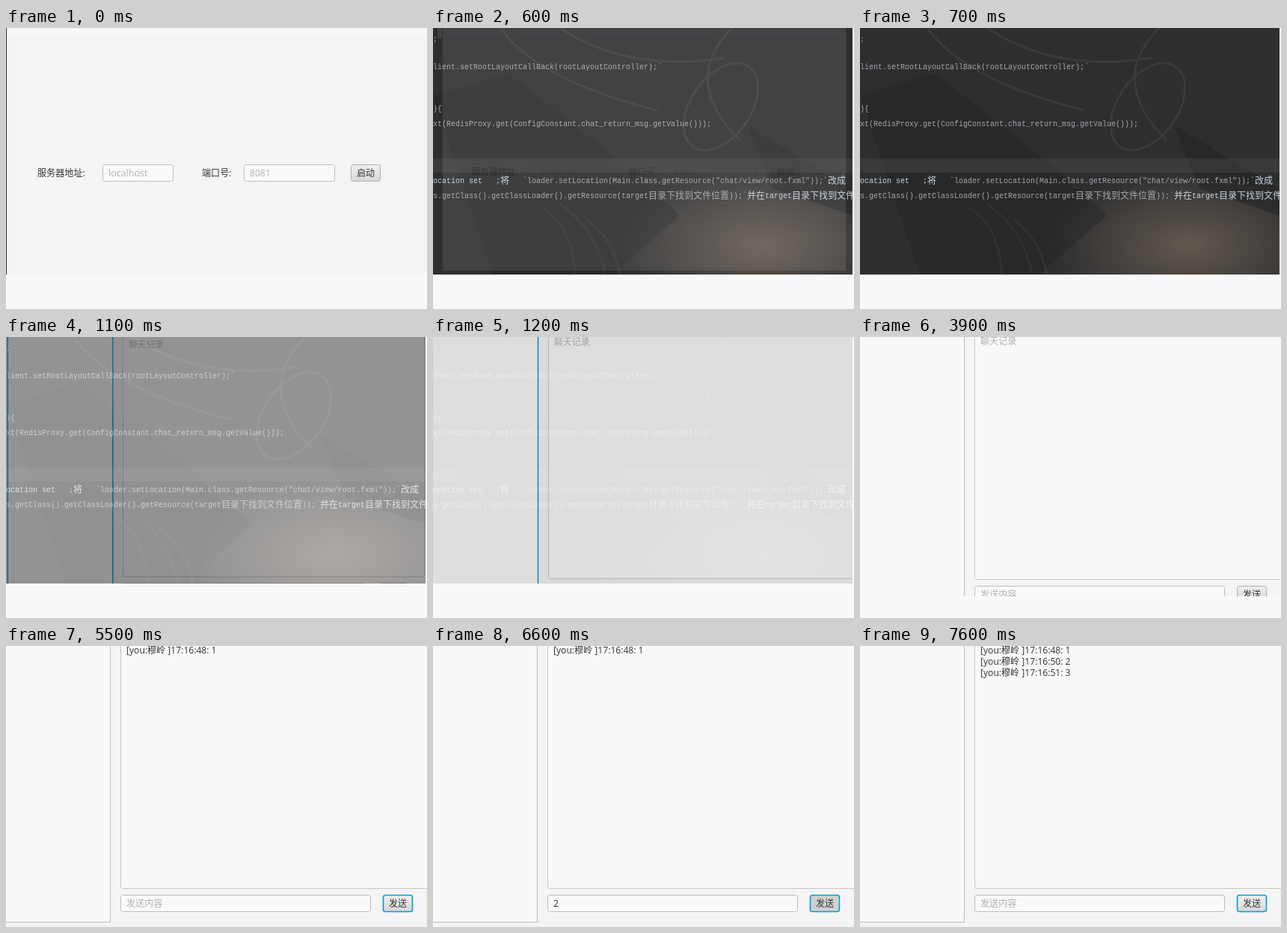
Write an HTML page that moves like this. It is 563 px wide and 375 px high and loops after 8400 ms.

```html
<!DOCTYPE html>
<html lang="zh-CN">
<head>
<meta charset="utf-8">
<title>聊天窗口</title>
<style>
html, body { margin: 0; width: 100%; height: 100%; overflow: hidden; background: #f8f8f8; }
svg { display: block; width: 563px; height: 375px; }
text { font: 12.1px "Open Sans", "Noto Sans CJK SC", "Noto Sans CJK", sans-serif; fill: #333; white-space: pre; }
.prompt { fill: #b2b2b2; }
.box { fill: #f9f9f9; stroke: #bcbcbc; }
.button { fill: url(#face); stroke: #b0b0b0; }
.focus { stroke: #039ed3; stroke-width: 1.6; }
.hover { fill: url(#lit); }
.pressed { fill: #d0d0d0; }
.code { font: 10px "Liberation Mono", "Noto Sans CJK SC", "Noto Sans CJK", monospace; fill: #a4a6a8; }
.cjk { font-size: 12px; }
.bright { fill: #c6d3df; }
</style>
</head>
<body>
<svg viewBox="0 0 563 375">
  <defs>
    <clipPath id="area"><rect id="areaRect" width="561" height="329"/></clipPath>
    <linearGradient id="face" x2="0" y2="1"><stop stop-color="#f0f0f0"/><stop offset="1" stop-color="#d7d7d7"/></linearGradient>
    <linearGradient id="lit" x2="0" y2="1"><stop stop-color="#f9f9f9"/><stop offset="1" stop-color="#e4e4e4"/></linearGradient>
    <radialGradient id="glow"><stop stop-color="#62584f"/><stop offset="1" stop-color="#62584f" stop-opacity="0"/></radialGradient>
  </defs>
  <g clip-path="url(#area)">
    <g id="editor">
      <rect width="563" height="329" fill="#2d2e30"/>
      <ellipse cx="440" cy="290" rx="190" ry="105" fill="url(#glow)"/>
      <g fill="none" stroke="#4a4a4a" stroke-width="3" opacity=".45">
        <path d="M90 0Q140 70 300 110M170 0Q260 60 390 40M400 0Q330 70 410 150"/>
        <path d="M145 240q40 20 45 89M170 235q50 35 60 94M205 255q35 25 45 74"/>
        <ellipse cx="385" cy="105" rx="40" ry="65" transform="rotate(35 385 105)"/>
      </g>
      <path d="M0 90L100 60L240 170L330 250L240 329H80Z" fill="#222" opacity=".35"/>
      <path d="M420 130L561 215V250L455 215Z" fill="#222" opacity=".5"/>
      <rect y="174" width="563" height="19" fill="#fff" opacity=".06"/>
      <g id="code"></g>
    </g>

    <g id="login">
      <rect x="-6" y="-40" width="572" height="47" fill="#f8f8f8"/>
      <rect y="7" width="566" height="325" fill="#f4f4f4"/>
      <rect y="-40" width="1" height="372" fill="#333"/>
      <text x="42" y="198">服务器地址:</text>
      <rect class="box" x="129.5" y="182.5" width="94" height="22" rx="3"/>
      <text class="prompt" x="137" y="198" style="font-size:12.5px">localhost</text>
      <text x="262" y="198">端口号:</text>
      <rect class="box" x="318.5" y="182.5" width="121" height="22" rx="3"/>
      <text class="prompt" x="326" y="198">8081</text>
      <rect class="button" x="461.5" y="182.5" width="39" height="22" rx="3"/>
      <text x="469" y="198">启动</text>
    </g>

    <g id="chat">
      <rect x="-12" y="-60" width="590" height="450" fill="#f4f4f4"/>
      <rect id="list" class="box" x="-4.5" y="-40" width="144" height="408.5" style="fill:#f8f8f8"/>
      <rect class="box" x="153.5" y="-20" width="413" height="343.5" rx="3" style="fill:#f8f8f8;stroke:#c6c6c6"/>
      <text id="logPrompt" class="prompt" x="161" y="10">聊天记录</text>
      <g id="log"></g>
      <rect id="field" class="box" x="153.5" y="332.5" width="334" height="22" rx="3"/>
      <text id="fieldPrompt" class="prompt" x="161" y="348">发送内容</text>
      <text id="typed" x="161" y="348"></text>
      <rect id="caret" y="336" width="1" height="15" fill="#333"/>
      <rect id="send" class="button" x="504.5" y="332.5" width="39" height="22" rx="3"/>
      <text x="512" y="348">发送</text>
    </g>
  </g>
</svg>
<script>
const LOOP = 8400;
const $ = id => document.getElementById(id);
const show = (id, on) => { $(id).style.display = on ? '' : 'none'; };
const within = (t, spans) => spans.some(([a, b]) => t >= a && t < b);

function addText(parent, x, y, content, cls = '') {
  const el = document.createElementNS('http://www.w3.org/2000/svg', 'text');
  el.setAttribute('x', x);
  el.setAttribute('y', y);
  el.setAttribute('class', cls);
  el.textContent = content;
  $(parent).append(el);
  return el;
}

// Latin glyphs are 6px wide, Chinese glyphs 12px.
function codeLine(y, ...parts) {
  let x = 0;
  for (const [content, cls = ''] of parts) {
    const wide = /[\u4e00-\u9fff]/.test(content);
    addText('code', x, wide ? y + 1 : y, content, `code ${wide ? 'cjk' : ''} ${cls}`);
    x += content.length * (wide ? 12 : 6);
  }
}
codeLine(18, [';']);
codeLine(55, ['lient.setRootLayoutCallBack(rootLayoutController);`']);
codeLine(111, ['){']);
codeLine(131, ['xt(RedisProxy.get(ConfigConstant.chat_return_msg.getValue()));']);
codeLine(207, ['ocation set   ;', 'bright'], ['将', 'bright'],
  ['   `loader.setLocation(Main.class.getResource("chat/view/root.fxml"));`'], ['改成', 'bright']);
codeLine(227, ['s.getClass().getClassLoader().getResource(target'], ['目录下找到文件位置'], ['));`'],
  ['并在', 'bright'], ['target', 'bright'], ['目录下找到文件', 'bright']);

// One entry per message: focus field, type, click send, message appears.
const sends = [
  { focus: 4600, type: 4800, click: 5100, sent: 5200, clock: '17:16:48' },
  { focus: 5700, type: 5800, click: 6600, sent: 6700, clock: '17:16:50' },
  { focus: 6900, type: 7000, click: 7300, sent: 7400, clock: '17:16:51' },
];
sends.forEach((s, i) => {
  s.line = addText('log', 161, 10 + 15 * i, `[you:穆岭 ]${s.clock}: ${i + 1}`);
});

function place(id, alpha, scale, cx, cy) {
  show(id, alpha > 0);
  $(id).setAttribute('opacity', alpha);
  $(id).setAttribute('transform', `translate(${cx} ${cy}) scale(${scale}) translate(${-cx} ${-cy})`);
}

function draw(t) {
  const closing = t < 400 ? [1, 1] : t < 500 ? [.75, .985] : t < 600 ? [.35, .97] : t < 700 ? [.1, .955] : [0, 1];
  const opening = t < 1100 ? [0, 1] : t < 1200 ? [.5, .976] : t < 1300 ? [.87, .993] : [1, 1];
  place('login', ...closing, 262, 149);
  place('chat', ...opening, 279, 164);
  show('editor', t >= 400 && t < 1300);

  $('areaRect').setAttribute('width', t < 4000 ? 561 : 563);
  $('areaRect').setAttribute('height', t < 3900 ? 329 : t < 4000 ? 346 : t < 4100 ? 360 : 375);
  $('list').classList.toggle('focus', t < 3900);

  const typing = sends.some(s => t >= s.focus && t < s.click);
  const digit = sends.findIndex(s => t >= s.type && t < s.sent) + 1;
  $('field').classList.toggle('focus', typing);
  $('typed').textContent = digit || '';
  show('fieldPrompt', !typing && !digit);
  show('caret', typing && !within(t, [[6300, 6400]]));
  $('caret').setAttribute('x', digit ? 168 : 161);

  $('send').classList.toggle('focus', !typing && t >= sends[0].click);
  $('send').classList.toggle('hover', within(t, [[4900, 5500], [6400, 6900], [7300, 7600]]));
  $('send').classList.toggle('pressed', sends.some(s => t >= s.click && t < s.sent));

  show('logPrompt', t < sends[0].sent);
  for (const s of sends) s.line.style.display = t >= s.sent ? '' : 'none';
}

const start = performance.now();
function tick() {
  draw((performance.now() - start) % LOOP);
  requestAnimationFrame(tick);
}
tick();
</script>
</body>
</html>
```
